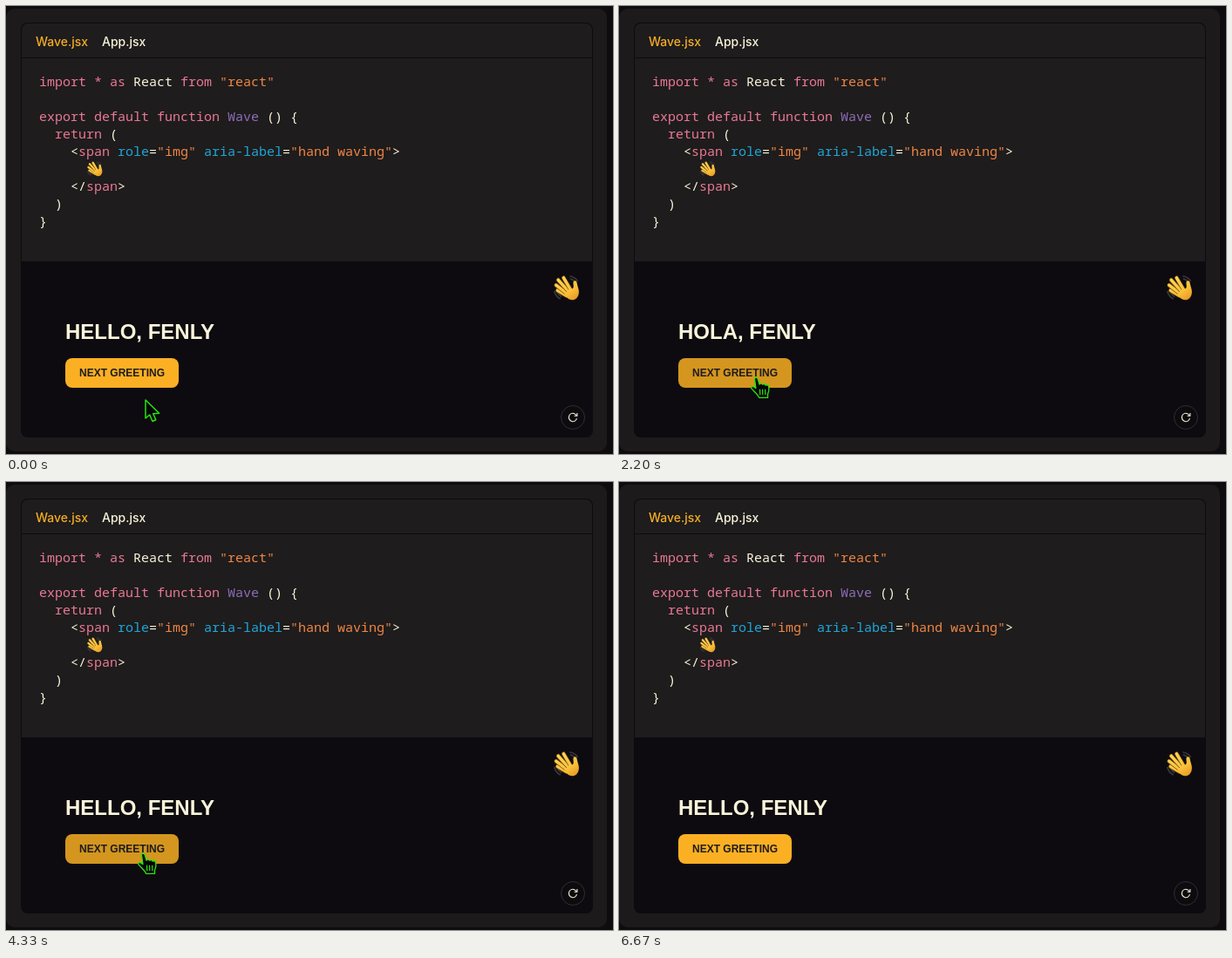
An HTML page with a canvas for the animation above (6.74 s loop, 696x514 px).

```html
<!DOCTYPE html>
<html lang="en">
<head>
<meta charset="utf-8">
<title>Wave</title>
<style>
  html, body { margin: 0; width: 100%; height: 100%; overflow: hidden; background: #0e0c0e; }
  canvas { display: block; width: 696px; height: 514px; }
</style>
</head>
<body>
<canvas id="stage"></canvas>
<script>
const W = 696, H = 514, LOOP = 6740, STEP = LOOP / 101;
const canvas = document.getElementById('stage');
const ctx = canvas.getContext('2d');
const dpr = window.devicePixelRatio || 1;
canvas.width = W * dpr;
canvas.height = H * dpr;

const C = {
  page: '#0e0c0e', panel: '#1c1a1b', code: '#1e1c1c', dark: '#0d0b0f',
  beige: '#f9f4da', pink: '#ea7896', orange: '#f08646', blue: '#1fa6d8',
  purple: '#8e6dba', yellow: '#fbb024', hover: '#d4961f', green: '#2be312'
};
const MONO = '500 15px "Noto Sans Mono", monospace';
const TAB = '500 14px Inter, sans-serif';
const bold = size => `bold ${size}px "Liberation Sans", Arial, sans-serif`;

// Each line: row, column, then [text, colour] pairs.
const LINES = [
  [0, 0, ['import * as ', 'pink'], ['React ', 'beige'], ['from ', 'pink'], ['"react"', 'orange']],
  [2, 0, ['export default function ', 'pink'], ['Wave ', 'purple'], ['() {', 'beige']],
  [3, 2, ['return ', 'pink'], ['(', 'beige']],
  [4, 4, ['<', 'beige'], ['span ', 'pink'], ['role', 'blue'], ['=', 'beige'], ['"img" ', 'orange'],
    ['aria-label', 'blue'], ['=', 'beige'], ['"hand waving"', 'orange'], ['>', 'beige']],
  [6, 4, ['</', 'beige'], ['span', 'pink'], ['>', 'beige']],
  [7, 2, [')', 'beige']],
  [8, 0, ['}', 'beige']]
];

const GREETINGS = [[3600, 'HELLO'], [2600, 'BONJOUR'], [1600, 'HOLA'], [0, 'HELLO']];
const NAME = 'FENLY';

function text(str, x, y, font, color) {
  ctx.font = font;
  ctx.fillStyle = color;
  ctx.fillText(str, x, y);
}

function box(x, y, w, h, r, fill) {
  ctx.beginPath();
  ctx.roundRect(x, y, w, h, r);
  ctx.fillStyle = fill;
  ctx.fill();
}

function path(points, close) {
  ctx.beginPath();
  points.forEach(([x, y], i) => i ? ctx.lineTo(x, y) : ctx.moveTo(x, y));
  if (close) ctx.closePath();
}

function stroke(color, width) {
  ctx.strokeStyle = color;
  ctx.lineWidth = width;
  ctx.stroke();
}

function at(x, y, scale, draw) {
  ctx.save();
  ctx.translate(x, y);
  ctx.scale(scale, scale);
  ctx.lineCap = ctx.lineJoin = 'round';
  draw();
  ctx.restore();
}

// Waving hand on a 30 by 30 grid.
function wave() {
  const arcs = [[14, 16, 13, 2.1, 2.9], [14, 16, 10.2, 2.1, 2.8],
                [17, 14, 12.2, -1.4, -0.6], [17, 14, 9.4, -1.3, -0.7]];
  for (const [x, y, r, a, b] of arcs) {
    ctx.beginPath();
    ctx.arc(x, y, r, a, b);
    stroke('#39383b', 1.7);
  }
  const skin = ctx.createLinearGradient(6, 4, 24, 29);
  skin.addColorStop(0, '#ffd755');
  skin.addColorStop(0.6, '#fcc23c');
  skin.addColorStop(1, '#e79a22');
  const fingers = [[4.8, 18, 15, 24], [3.2, 12, 16, 22], [5.6, 6.2, 18, 20], [11.6, 3.8, 20, 18]];
  for (const [x, y, px, py] of fingers) {
    path([[x, y], [px, py]]);
    stroke('#7d5314', 4.7);
    stroke(skin, 3.3);
  }
  ctx.beginPath();
  ctx.moveTo(12.5, 22);
  ctx.lineTo(19, 15.5);
  ctx.quadraticCurveTo(22, 17.5, 22.8, 14);
  ctx.lineTo(22.5, 9.5);
  ctx.bezierCurveTo(22.5, 6.3, 26.2, 6.5, 26.6, 9.5);
  ctx.bezierCurveTo(27.5, 15, 30, 18, 28.3, 23);
  ctx.bezierCurveTo(26, 30, 19, 30, 15.5, 26);
  ctx.closePath();
  ctx.fillStyle = skin;
  ctx.fill();
}

function arrow() {
  path([[0, 0], [0, 21], [4.7, 17], [8, 24.5], [11.8, 22.8], [8.7, 15.7], [15.6, 15.2]], true);
  ctx.fillStyle = '#050505';
  ctx.fill();
  stroke(C.green, 1.5);
}

function pointer() {
  ctx.beginPath();
  ctx.moveTo(-0.6, 0.8);
  ctx.bezierCurveTo(0.2, -0.8, 2.4, -0.4, 3, 1.2);
  ctx.lineTo(4.8, 7.2);
  ctx.bezierCurveTo(6, 5.9, 7.6, 6.2, 8.3, 7.4);
  ctx.bezierCurveTo(9.5, 6.4, 11, 6.8, 11.6, 8.2);
  ctx.bezierCurveTo(13.2, 7.4, 14.8, 8.2, 15, 10);
  ctx.bezierCurveTo(15.8, 14, 15, 16, 13.8, 18.2);
  ctx.lineTo(13.9, 21.8);
  ctx.lineTo(4.4, 21.8);
  ctx.bezierCurveTo(3.2, 18, -1.2, 15, -4, 11.6);
  ctx.bezierCurveTo(-4.8, 9.4, -2.2, 8.7, 0.9, 11.5);
  ctx.closePath();
  ctx.fillStyle = '#050505';
  ctx.fill();
  stroke(C.green, 1.3);
  for (const x of [5.3, 8.2, 11.1]) {
    path([[x, 13], [x + 0.2, 18.3]]);
    stroke(C.green, 1.2);
  }
}

function reload() {
  ctx.beginPath();
  ctx.arc(650, 472, 13.5, 0, 7);
  ctx.fillStyle = C.dark;
  ctx.fill();
  stroke('#302e30', 1);
  ctx.beginPath();
  ctx.arc(650, 472, 4.6, 0.25, -0.45);
  stroke(C.beige, 1.1);
  path([[654.9, 467], [654.9, 470.3], [651.6, 470.3]]);
  stroke(C.beige, 1.1);
}

const ease = p => {
  p = Math.min(1, Math.max(0, p));
  return p * p * (3 - 2 * p);
};

function cursorAt(t) {
  const k = ease((t - 40) / 520) - ease((t - 6000) / 400);
  return { x: 160 - 4 * k, y: 452 - 25.5 * k, shown: t < 6500 };
}

function draw(t) {
  const cursor = cursorAt(t);
  const over = cursor.shown && cursor.y < 438;

  ctx.setTransform(dpr, 0, 0, dpr, 0, 0);
  ctx.fillStyle = C.page;
  ctx.fillRect(0, 0, W, H);
  box(0, 3, 689, 508, 10, C.panel);

  box(17, 19, 656, 476, 8, C.dark);
  box(18, 20, 654, 273, [7, 7, 0, 0], C.code);
  ctx.fillStyle = C.dark;
  ctx.fillRect(18, 59, 654, 1);

  text('Wave.jsx', 34, 46, TAB, '#f6ad26');
  text('App.jsx', 110, 46, TAB, C.beige);

  for (const [row, col, ...parts] of LINES) {
    let c = col;
    for (const [str, color] of parts) {
      text(str, 38 + c * 9, 92 + row * 20, MONO, C[color]);
      c += str.length;
    }
  }
  at(92.5, 177.5, 0.62, wave);
  at(627.5, 308, 1.02, wave);

  const greeting = GREETINGS.find(([start]) => t >= start)[1];
  text(`${greeting}, ${NAME}`, 68, 382, bold(24), C.beige);

  box(68, 404, 130, 34, 8, over ? C.hover : C.yellow);
  text('NEXT GREETING', 84, 425, bold(12), '#1e1c1c');
  reload();

  if (cursor.shown) at(cursor.x, cursor.y, over ? 1.05 : 1, over ? pointer : arrow);
}

const begin = performance.now();
function tick() {
  const t = (performance.now() - begin) % LOOP;
  draw(Math.floor(t / STEP) * STEP);
  requestAnimationFrame(tick);
}
tick();
</script>
</body>
</html>
```
